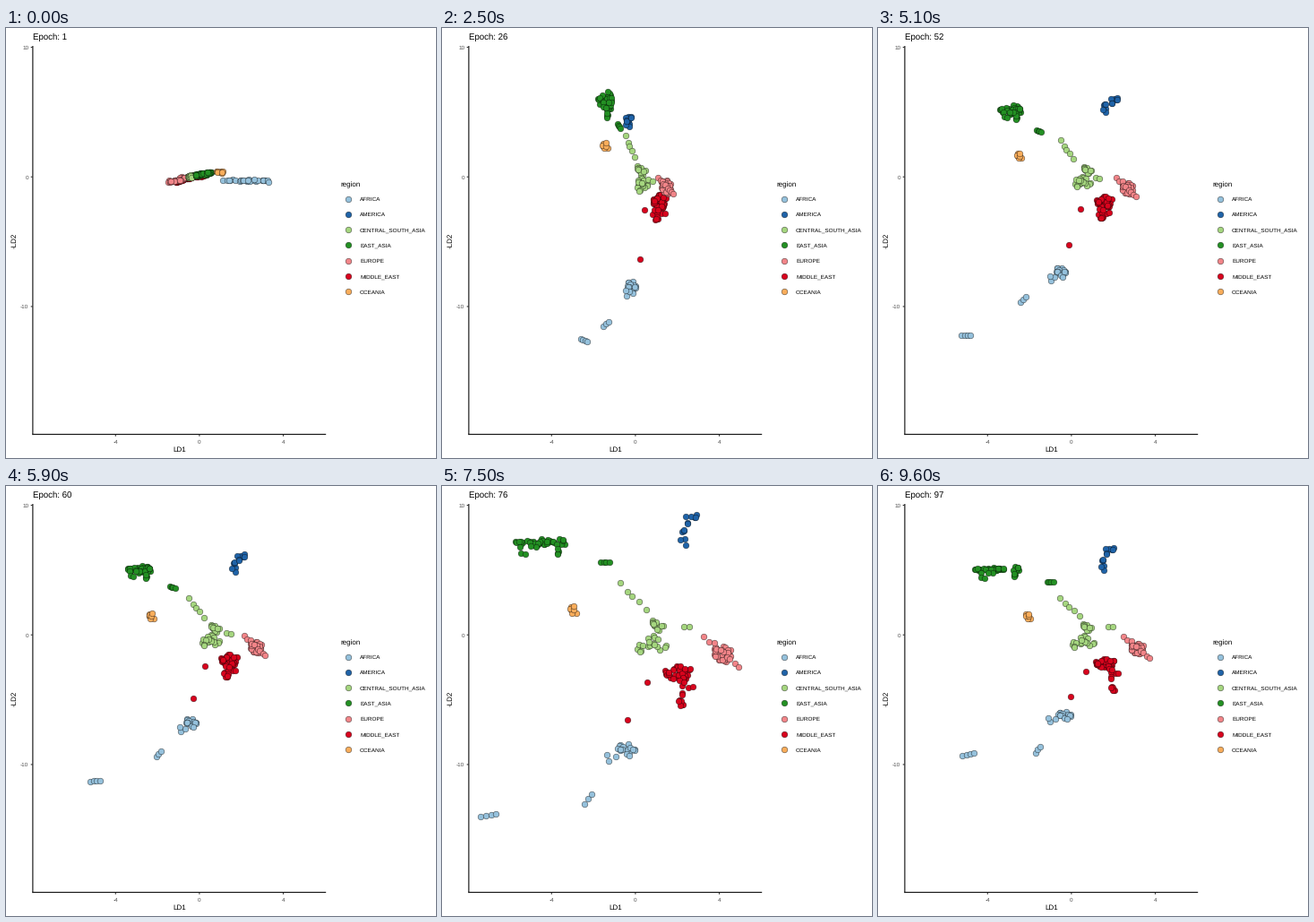
Recreate the animation shown at these times as a matplotlib script. Size 480 by 480 pixels, loop 9700 ms.

```python
import matplotlib.pyplot as plt
import numpy as np
from matplotlib.animation import FuncAnimation

SIZE, DPI = 480, 96
PX = 72 / DPI
FRAMES, STEP = 97, 100
ORIGIN = np.array([215.7, 166.0])

# Per region: colour and the stretch of the starting curve it covers
REGIONS = {
    "AFRICA": ("#95c1dc", 242, 295),
    "AMERICA": ("#1f63a8", 212, 222),
    "CENTRAL_SOUTH_ASIA": ("#a5d67f", 203, 212),
    "EAST_ASIA": ("#239023", 211, 230),
    "EUROPE": ("#f28589", 181, 206),
    "MIDDLE_EAST": ("#d8041d", 189, 222),
    "OCEANIA": ("#f9ad5b", 235, 243),
}
PAINT_ORDER = ["AMERICA", "MIDDLE_EAST", "EUROPE", "CENTRAL_SOUTH_ASIA",
               "EAST_ASIA", "OCEANIA", "AFRICA"]

rng = np.random.default_rng(7)
groups = {name: [] for name in REGIONS}


def start_curve(region, n):
    _, low, high = REGIONS[region]
    x = rng.uniform(low, high, n)
    rise = 160 + 12 * np.clip((240 - x) / 60, 0, 1) ** 1.3
    y = np.full(n, 170.0) if region == "AFRICA" else rise
    if region == "MIDDLE_EAST":
        y += 1.5
    return np.column_stack([x, y + rng.normal(0, 0.7, n)])


def add(region, offsets, path, young, mature):
    start = start_curve(region, len(offsets))
    groups[region].append((start, offsets, *map(np.array, (path, young, mature))))


def cloud(region, n, path, young, mature):
    """Points filling an ellipse whose half axes go from young to mature."""
    radius, angle = rng.random(n) ** 0.55, rng.uniform(0, 2 * np.pi, n)
    add(region, np.column_stack([radius * np.cos(angle), radius * np.sin(angle)]),
        path, young, mature)


def strand(region, n, path, young, mature):
    """Points strung along a slanted line, with a little scatter."""
    along = np.linspace(-1, 1, n)[:, None]
    add(region, along + rng.normal(0, 0.08, (n, 2)), path, young, mature)


cloud("AFRICA", 17, [(208, 287), (216, 269), (204, 272), (209, 256), (208, 259)], (4, 7), (8, 5))
cloud("AFRICA", 3, [(207, 290), (209, 278), (195, 279), (200, 264), (194, 264)], (3, 3), (11, 3))
strand("AFRICA", 3, [(201, 309), (171, 322), (162, 303), (179, 295), (177, 299)], (3, -2), (3, -4))
strand("AFRICA", 4, [(197, 309), (130, 356), (98, 343), (100, 315), (96, 304)], (3, 2), (7, -2))

cloud("AMERICA", 6, [(206, 108), (208, 116), (252, 90), (255, 92), (251, 86)], (4, 4), (4, 8))
cloud("AMERICA", 7, [(210, 103), (208, 112), (264, 82), (261, 79), (260, 70)], (3, 4), (6, 7))

strand("CENTRAL_SOUTH_ASIA", 5, [(213, 134), (208, 137), (211, 136), (214, 137), (214, 134)],
       (3, 11), (11, 10))
cloud("CENTRAL_SOUTH_ASIA", 12, [(214, 159), (226, 159), (232, 158), (231, 159), (232, 157)],
      (6, 6), (7, 5))
cloud("CENTRAL_SOUTH_ASIA", 13, [(217, 172), (230, 169), (231, 169), (232, 170), (234, 171)],
      (6, 7), (11, 8))
cloud("CENTRAL_SOUTH_ASIA", 5, [(215, 180), (223, 174), (221, 174), (219, 177), (218, 178)],
      (5, 9), (5, 5))
strand("CENTRAL_SOUTH_ASIA", 2, [(223, 167), (239, 172), (245, 167), (252, 162), (261, 156.5)],
       (2, 1), (2, 0))

cloud("EAST_ASIA", 33, [(208, 94), (163, 80), (148, 91), (150, 94), (122, 90)], (6, 9), (18, 1.5))
cloud("EAST_ASIA", 10, [(208, 108), (172, 92), (158, 97), (162, 99), (154, 94)], (4, 9), (7, 8))
cloud("EAST_ASIA", 5, [(208, 99), (164, 86), (144, 96), (140, 99), (116, 97)], (5, 6), (9, 7))
strand("EAST_ASIA", 4, [(209, 116), (190, 113), (180, 115), (192, 111), (192, 105)], (1, 2), (4, 0))

cloud("EUROPE", 32, [(232, 174), (260, 179), (277, 179), (278, 181), (290, 182)], (6, 8), (10, 7))
strand("EUROPE", 9, [(232, 172), (261, 179), (277, 178), (278, 179), (291, 181)], (6, 8), (14, 13))

cloud("MIDDLE_EAST", 36, [(228, 190), (252, 192), (252, 194), (245, 194), (254, 199)],
      (7, 8), (13, 6))
cloud("MIDDLE_EAST", 6, [(224, 206), (249, 208), (249, 210), (242, 213), (264, 229)], (6, 5), (4, 3))
cloud("MIDDLE_EAST", 7, [(228, 200), (252, 206), (252, 206), (248, 205), (264, 210)],
      (6, 6), (6, 8))
cloud("MIDDLE_EAST", 1, [(213, 255), (228, 244), (213, 242), (205, 231), (215, 237)], (0, 0), (0, 0))
cloud("MIDDLE_EAST", 1, [(218, 199), (232, 200), (226, 202), (218, 200), (233, 208)], (0, 0), (0, 0))

cloud("OCEANIA", 8, [(189, 128), (180, 142), (157, 143), (166, 148), (165, 145)], (4, 4), (4, 4))


def spread(frame):
    def bump(at, width):
        return np.exp(-((frame - at) / width) ** 2 / 2)
    settle = np.clip((frame - 84) / 12, 0, 1)
    return 1 + 0.5 * bump(6, 3) + 0.1 * bump(26, 4) + 0.4 * bump(75, 2.7) - 0.035 * settle


def positions(region, frame):
    stage = np.interp(frame, [0, 6, 15, 35, 51, 67, 84], [0, 0.9, 1, 2, 3, 4, 5])
    leave = min(stage, 1)
    age = max(stage - 1, 0) / 4
    points = []
    for start, offsets, path, young, mature in groups[region]:
        center = [np.interp(stage, range(1, 6), axis) for axis in path.T]
        placed = center + offsets * (young + (mature - young) * age)
        points.append(start + (placed - start) * leave)
    points = np.vstack(points)
    grow = 1 + (spread(frame) - 1) * leave
    return ORIGIN + (points - ORIGIN) * grow


plt.rcParams.update({"font.family": "Liberation Sans", "text.hinting": "none"})
fig = plt.figure(figsize=(SIZE / DPI, SIZE / DPI), dpi=DPI, facecolor="white")
ax = fig.add_axes([0, 0, 1, 1])
ax.set(xlim=(0, SIZE), ylim=(SIZE, 0))
ax.axis("off")


def label(x, y, text, size, color="black", **kw):
    return ax.text(x, y, text, fontsize=size * PX, color=color, va="baseline", **kw)


def line(xs, ys, color="black"):
    ax.plot(xs, ys, color=color, lw=1.07 * PX, solid_capstyle="butt", snap=False, zorder=1)


def markers(points, color):
    x, y = np.transpose(points)
    return ax.scatter(x, y, s=(6.6 * PX) ** 2, c=color, edgecolors=(0, 0, 0, 0.6),
                      linewidths=0.6 * PX, zorder=3)


line([29.9, 29.9], [20, 454.1])
line([29.4, 357.2], [453.6, 453.6])
for value in (10, 0, -10):
    y = 166.2 - 14.47 * value
    line([27.7, 29.9], [y, y], "#333333")
    label(25.3, y + 2.4, str(value), 6.4, "#4d4d4d", ha="right")
for value in (-4, 0, 4):
    x = 215.9 + 23.4 * value
    line([x, x], [453.6, 455.8], "#333333")
    label(x, 463.6, str(value), 6.4, "#4d4d4d", ha="center")

title = label(29.7, 13.4, "", 9.6)
label(193.5, 473, "LD1", 8, ha="center")
label(11.8, 237, "-LD2", 8, ha="center", rotation=90, rotation_mode="anchor")
label(373.7, 177.7, "region", 8)
for row, (name, (color, *_)) in enumerate(REGIONS.items()):
    y = 190.5 + 17.3 * row
    markers([(382.3, y)], color)
    label(395, y + 2.4, name, 6.4)

dots = {name: markers(positions(name, 0), REGIONS[name][0]) for name in PAINT_ORDER}


def draw(frame):
    title.set_text(f"Epoch: {frame + 1}")
    for name, art in dots.items():
        art.set_offsets(positions(name, frame))
    return [title, *dots.values()]


anim = FuncAnimation(fig, draw, frames=FRAMES, interval=STEP, repeat=True, repeat_delay=0)
plt.show()
```
